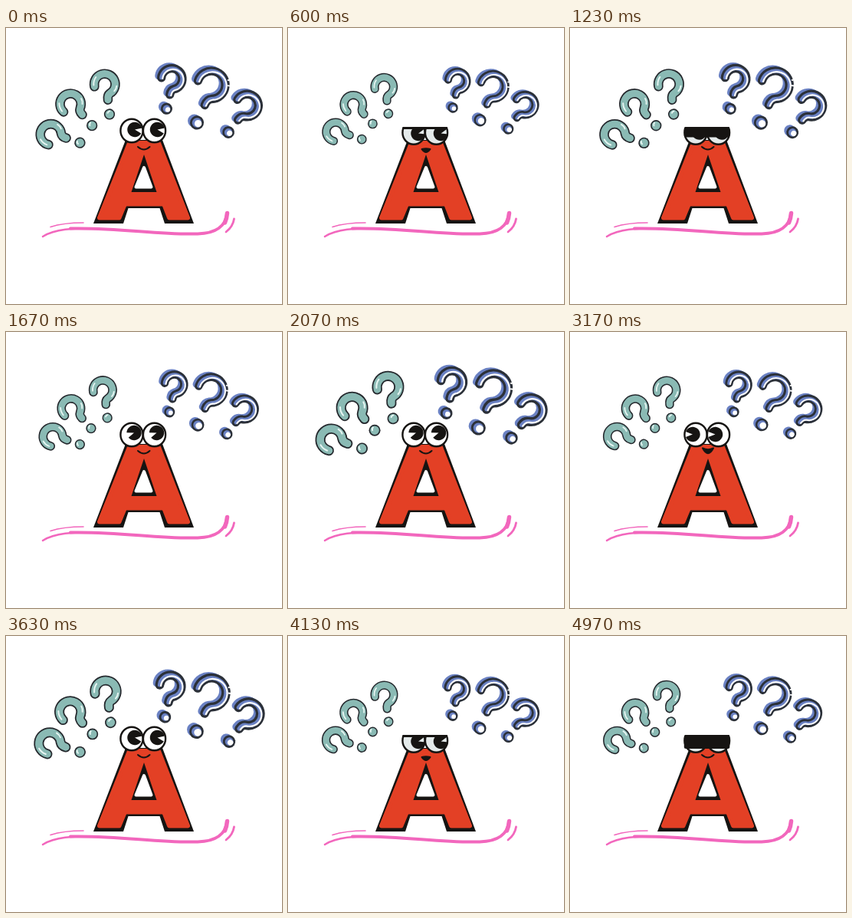
Recreate the animation shown at these times as an HTML page. Size 360x360 px, loop 5 s.

```html
<!DOCTYPE html>
<html>
<head>
<meta charset="utf-8">
<style>
html, body { margin: 0; width: 100%; height: 100%; overflow: hidden; background: #fff; }
svg { display: block; width: 100vw; height: 100vh; }
.line { fill: none; stroke-linecap: round; stroke-linejoin: round; }
</style>
</head>
<body>
<svg viewBox="0 0 360 360">
  <defs>
    <path id="hook" d="M-13.800 1A13.800 13.800 0 1 1 5 13Q1 15 1 21"/>
    <clipPath id="low"><rect x="140" y="129" width="80" height="40"/></clipPath>
  </defs>
  <g id="green"></g>
  <g id="blue"></g>

  <path d="M156 146H204L245 255H207L200.500 235H159.500L153 255H114Z" fill="#161412"/>
  <path d="M161 150H199L237 247.500H213L206 229.500H155L147.500 247.500H122Z" fill="#e34025" stroke="#e34025" stroke-width="6" stroke-linejoin="round"/>
  <path d="M180 165L196.500 214H163.500Z" fill="#161412"/>
  <path d="M180 182L189.500 207.500H169.500Z" fill="#fff" stroke="#fff" stroke-width="4" stroke-linejoin="round"/>

  <g class="line" stroke="#f267bd">
    <path d="M48 272C64 262 88 261 115 261.500" stroke-width="2.500"/>
    <path d="M84 261.500C150 260 195 270 250 268.500C274 268 287 258 288.500 241" stroke-width="4"/>
    <path d="M285.500 254Q288 248 288.500 241.500" stroke-width="5.500"/>
    <path d="M58 259.500Q75 254 101 254" stroke-width="1.600"/>
    <path d="M287 266Q296 259 297.500 249" stroke-width="2.800"/>
  </g>

  <g id="eyes">
    <g id="balls" stroke="#161412" stroke-width="2.400">
      <ellipse cx="164" cy="134" rx="14.600" ry="15.300"/>
      <ellipse cx="193.500" cy="134" rx="14.600" ry="15.300"/>
    </g>
    <g id="pupils"></g>
  </g>
  <rect id="lid" x="148.800" y="129" width="59.500" rx="2.500" fill="#161412"/>
  <path id="mouth" class="line" stroke="#161412" stroke-width="2"/>
</svg>
<script>
const $ = id => document.getElementById(id);

const use = (color, width, dx = 0, dy = 0) =>
  `<use href="#hook" class="line" stroke="${color}" stroke-width="${width}" x="${dx}" y="${dy}"/>`;
const dot = (color, r, dx = 0, dy = 0) =>
  `<circle cx="${dx}" cy="${40 + dy}" r="${r}" fill="${color}"/>`;
const place = (x, y, angle, size, body) =>
  `<g transform="translate(${x} ${y}) rotate(${angle}) scale(${size})">${body}</g>`;

const ink = '#24282d', teal = '#8abab4', navy = '#2b3038', sky = '#6a81c3';
const greenMark = use(ink, 12.6) + use(teal, 9.2) + dot(ink, 7.2) + dot(teal, 5.6) +
  `<path class="line" d="M-14.500 -1Q-14 -7 -10 -11M15 5Q14 9 11 11M-2 38Q-1 36 1 36" stroke="#e6f5f2" stroke-width="2"/>`;

// Pen widths and offsets stay in stage pixels, whatever the mark's tilt and size.
const blueMark = (angle, size) => {
  const a = angle * Math.PI / 180, c = Math.cos(a) / size, s = Math.sin(a) / size;
  const off = (x, y) => [x * c + y * s, y * c - x * s];
  const pen = w => w / size;
  const back = off(-3.5, -2.5), core = off(1.6, 1.2);
  const r = 3 + 4.6 * size;
  return use(sky, pen(10), ...back) + dot(sky, pen(r - 0.5), ...back) +
    use(navy, pen(11.4)) + use(sky, pen(5)) + use('#fff', pen(2.2), ...core) +
    dot(navy, pen(r)) + dot(sky, pen(r - 2.8)) + dot('#fff', pen(r - 4.4), ...core);
};

$('green').innerHTML = [[129, 73, -9], [84, 99, -45], [58, 139, -74]]
  .map(([x, y, a]) => place(x, y, a, 1, greenMark)).join('');
$('blue').innerHTML = [[216, 66, 10, 1], [268, 74, 21, 1.33], [315, 101, 35, 1.08]]
  .map(([x, y, a, k]) => place(x, y, a, k, blueMark(a, k))).join('') +
  `<path d="M289 68L296 67M289 75L296 76" stroke="#fff" stroke-width="2"/>`;

// Pupil: a disc with a wedge cut out, facing right.
const pupil = '<path d="M0 0L9 -3.500A9.700 9.700 0 1 0 9 3.500Z" fill="#161412"/>';
$('pupils').innerHTML = pupil + pupil;

const smile = 'M172 155Q180 162 187.500 155';
const grin = 'M173 151.500Q180 155 187 151.500Q180 165 173 151.500Z';
const small = 'M174.500 158Q180 156.500 185.500 158Q180 166 174.500 158Z';

// start, pupil dx, dy, wedge angle, lid edge, mouth
const poses = [
  [0, 4, -1, 10, 0, smile],
  [280, 6, 4, -15, 132, small],
  [1140, 4, 2, -15, 147, smile],
  [1480, 3, -2, 160, 0, smile],
  [2400, -4, 0, 180, 0, grin],
  [3300, 4, -1, 10, 0, smile]
];
const faceLoop = 3700, loop = 5000, beat = 896, firstPeak = 171;

function pulse(t) {
  const phase = (((t - firstPeak) % beat) + beat) % beat;
  const away = Math.min(phase, beat - phase);
  return 0.89 + 0.26 * (1 - Math.max(0, away - 6) / (beat / 2 - 6)) ** 2;
}

function drawFace(t) {
  const i = poses.findLastIndex(p => p[0] <= t);
  const now = poses[i], was = poses[Math.max(0, i - 1)];
  const k = Math.min(1, (t - now[0]) / 130);
  const mix = n => was[n] + (now[n] - was[n]) * k;
  const shut = now[4] > 0;
  const edge = shut ? (was[4] ? mix(4) : now[4]) : 0;

  $('lid').setAttribute('height', shut ? edge - 129 : 0);
  $('eyes').setAttribute('clip-path', shut ? 'url(#low)' : 'none');
  $('balls').setAttribute('transform', `translate(0 ${shut ? 2.5 : 0})`);
  $('balls').setAttribute('fill', shut ? '#e4eaea' : '#fff');
  [...$('pupils').children].forEach((p, n) => p.setAttribute('transform',
    `translate(${164 + 29.5 * n + mix(1)} ${133.5 + mix(2)}) rotate(${now[3]})`));
  $('mouth').setAttribute('d', now[5]);
  $('mouth').style.fill = now[5] === smile ? 'none' : '#161412';
}

function zoom(id, x, y, s) {
  $(id).setAttribute('transform', `translate(${x} ${y}) scale(${s}) translate(${-x} ${-y})`);
}

function draw() {
  const t = performance.now() % loop;
  const s = pulse(t);
  zoom('green', 95, 105.5, s);
  zoom('blue', 263.5, 92.5, s);
  drawFace(t % faceLoop);
  requestAnimationFrame(draw);
}
draw();
</script>
</body>
</html>
```
